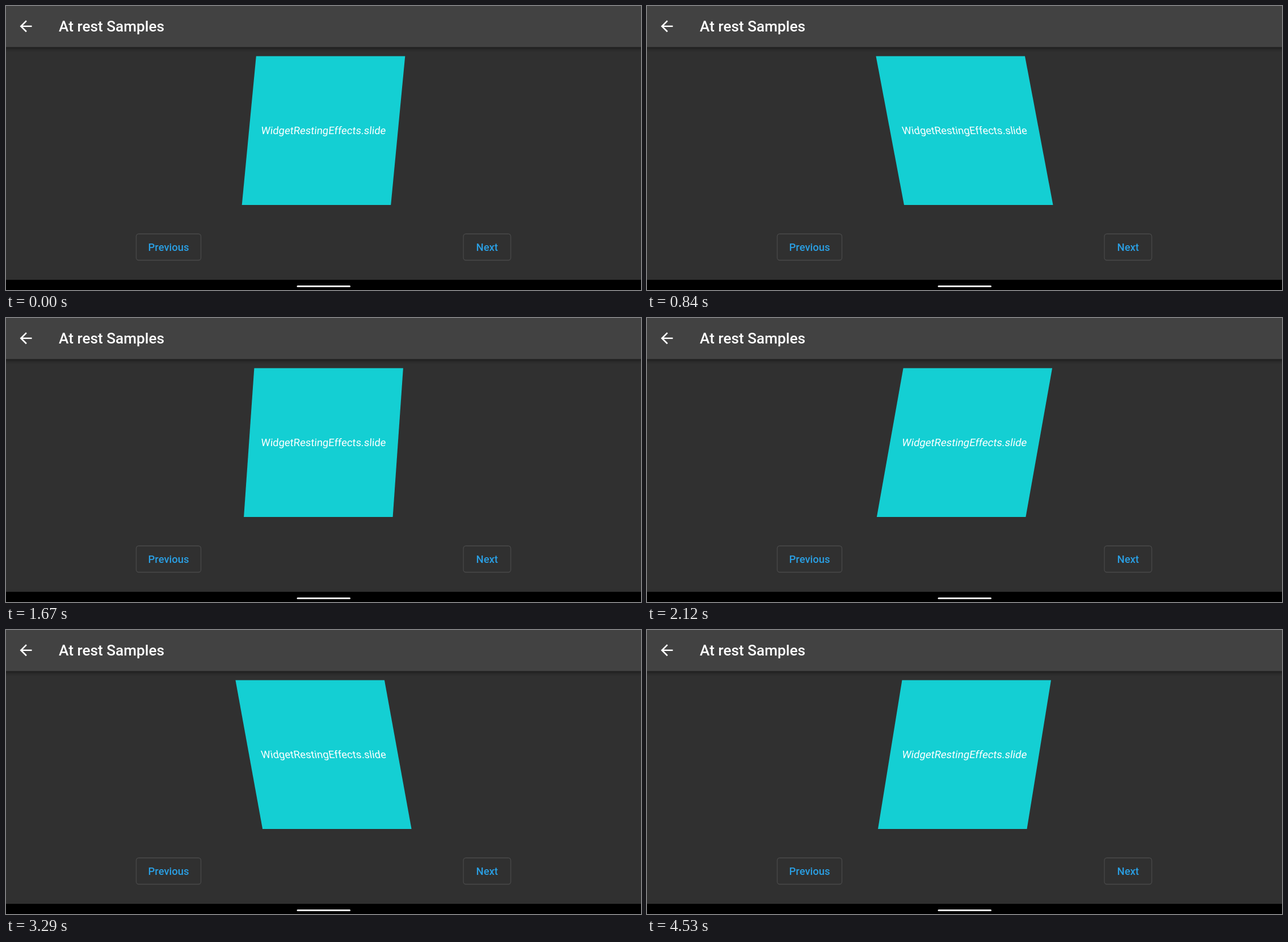
Recreate the animation shown at these times as an HTML page with a canvas. Size 1119 px wide and 501 px high, loop 4560 ms.

```html
<!DOCTYPE html>
<html lang="en">
<head>
<meta charset="utf-8">
<title>At rest Samples</title>
<style>
  html, body { margin: 0; width: 100%; height: 100%; overflow: hidden; background: #303030; }
  canvas { display: block; }
</style>
</head>
<body>
<canvas id="stage" width="1119" height="501"></canvas>
<script>
const ctx = document.getElementById('stage').getContext('2d');
const W = 1119, H = 501;
const LOOP = 4560;
const RATE = 0.001693;   // swing units per ms; a full swing is 4 units
const START = 0.52;
const MAX_SKEW = 0.2;
const SIDE = 262.5;
const ARROW = new Path2D('M20 11H7.83l5.59-5.59L12 4l-8 8 8 8 1.41-1.41L7.83 13H20v-2z');

function label(text, x, y, size, weight, color, align) {
  ctx.font = `${weight} ${size}px Roboto, sans-serif`;
  ctx.fillStyle = color;
  ctx.textAlign = align;
  ctx.fillText(text, x, y);
}

function rounded(x, y, w, h, r) {
  ctx.beginPath();
  ctx.roundRect(x, y, w, h, r);
}

function button(text, x, w) {
  rounded(x, 402, w, 46.5, 4.5);
  ctx.strokeStyle = '#494949';
  ctx.lineWidth = 1.3;
  ctx.stroke();
  label(text, x + w / 2, 432, 18.4, 500, '#2a9fe3', 'center');
}

function appBar() {
  ctx.save();
  ctx.shadowColor = 'rgba(0, 0, 0, 0.5)';
  ctx.shadowBlur = 7;
  ctx.shadowOffsetY = 2;
  ctx.fillStyle = '#424242';
  ctx.fillRect(-20, -20, W + 40, 92.5);
  ctx.restore();

  ctx.save();
  ctx.translate(35, 35.7);
  ctx.scale(1.315, 1.315);
  ctx.translate(-12, -12);
  ctx.fillStyle = '#fff';
  ctx.fill(ARROW);
  ctx.restore();
  label('At rest Samples', 93, 45.3, 26.2, 500, '#fff', 'left');
}

function navBar() {
  ctx.fillStyle = '#000';
  ctx.fillRect(0, 483, W, H - 483);
  rounded(512.5, 493, 94.5, 3, 1.5);
  ctx.fillStyle = '#f4f4f4';
  ctx.fill();
}

// Linear swing between 1 and -1.
function swing(t) {
  const u = (START + RATE * t) % 4;
  return Math.abs(u - 2) - 1;
}

function card(skew) {
  ctx.save();
  ctx.transform(1, 0, -skew, 1, 559.5, 219.75);
  ctx.fillStyle = '#14cfd3';
  ctx.fillRect(-SIDE / 2, -SIDE / 2, SIDE, SIDE);
  label('WidgetRestingEffects.slide', 0, 6.5, 18.4, 400, '#fff', 'center');
  ctx.restore();
}

function draw(t) {
  ctx.fillStyle = '#303030';
  ctx.fillRect(0, 0, W, H);
  appBar();
  card(MAX_SKEW * swing(t));
  button('Previous', 229.5, 114);
  button('Next', 806, 83.5);
  navBar();
}

const began = performance.now();
function tick() {
  draw((performance.now() - began) % LOOP);
  requestAnimationFrame(tick);
}
tick();
</script>
</body>
</html>
```
